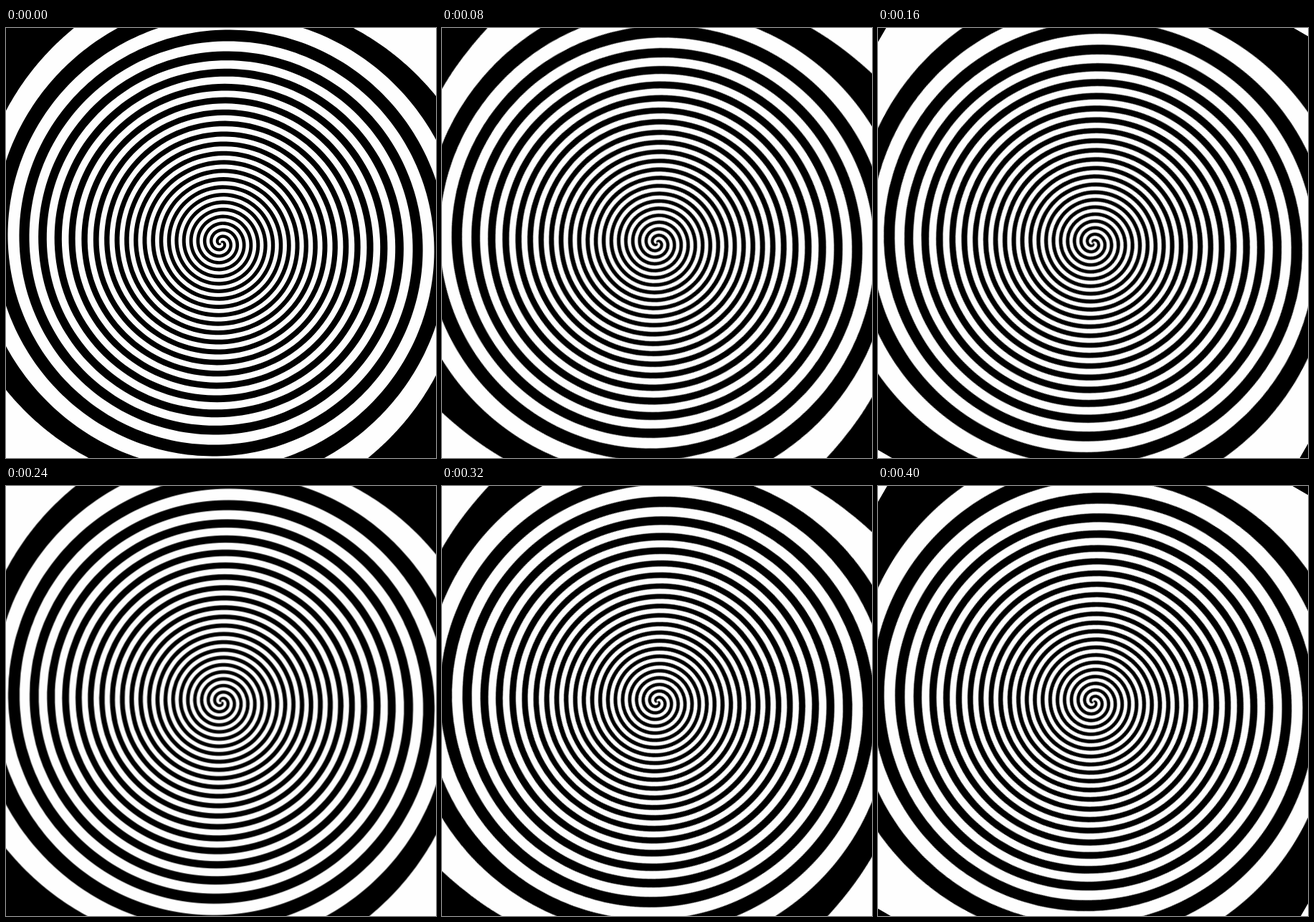
An HTML page that plays this animation: 600 by 600 pixels, repeating every 0.48 s.

```html
<!DOCTYPE html>
<html lang="en">
<head>
<meta charset="utf-8">
<title>Spinning spiral</title>
<style>
  html, body { margin: 0; width: 100%; height: 100%; overflow: hidden; background: #000; }
  svg { display: block; width: 100vw; height: 100vh; }
  .soft { filter: blur(0.75px); }
  .half, .sheet { transform-origin: 0 0; }
  /* a square sheet turns by thirds of a quarter over a backdrop that turns by quarters */
  .half { animation: half 480ms step-end infinite; }
  .sheet { animation: quarter 240ms steps(3) infinite; }
  /* the second half sits slightly off centre */
  @keyframes half {
    0% { transform: none; }
    50%, 100% { transform: translate(0.5px, 1.3px) rotate(-90deg); }
  }
  @keyframes quarter { to { transform: rotate(-90deg); } }
</style>
</head>
<body>
<svg viewBox="-300 -300 600 600">
  <defs>
    <clipPath id="square"><rect x="-400" y="-400" width="800" height="800"/></clipPath>
  </defs>
  <g class="soft">
    <g class="half">
      <rect x="-600" y="-600" width="1200" height="1200" fill="#000"/>
      <path d="M0 0V-600H600V0ZM0 0V600H-600V0Z" fill="#fefefe"/>
      <g class="sheet" clip-path="url(#square)">
        <rect x="-400" y="-400" width="800" height="800" fill="#000"/>
        <path id="arms" fill="#fefefe"/>
      </g>
    </g>
  </g>
</svg>
<script>
  const RADIUS = 400;    // the twirl fades out here
  const QUARTERS = 45.5; // quarter turns of twirl at the centre
  const STEP = 0.25;

  // clockwise from the top, angle in quarter turns
  function point(r, quarters) {
    const a = quarters * Math.PI / 2;
    return (r * Math.sin(a)).toFixed(2) + ' ' + (-r * Math.cos(a)).toFixed(2);
  }

  function edge(start) {
    const points = [];
    for (let r = 0; r <= RADIUS; r += STEP) {
      points.push(point(r, start - QUARTERS * (1 - r / RADIUS) ** 2));
    }
    points.push(point(3 * RADIUS, start));
    return points;
  }

  function arm(start) {
    return 'M' + edge(start).concat(edge(start + 1).reverse()).join('L') + 'Z';
  }

  document.getElementById('arms').setAttribute('d', arm(0) + arm(2));
</script>
</body>
</html>
```
